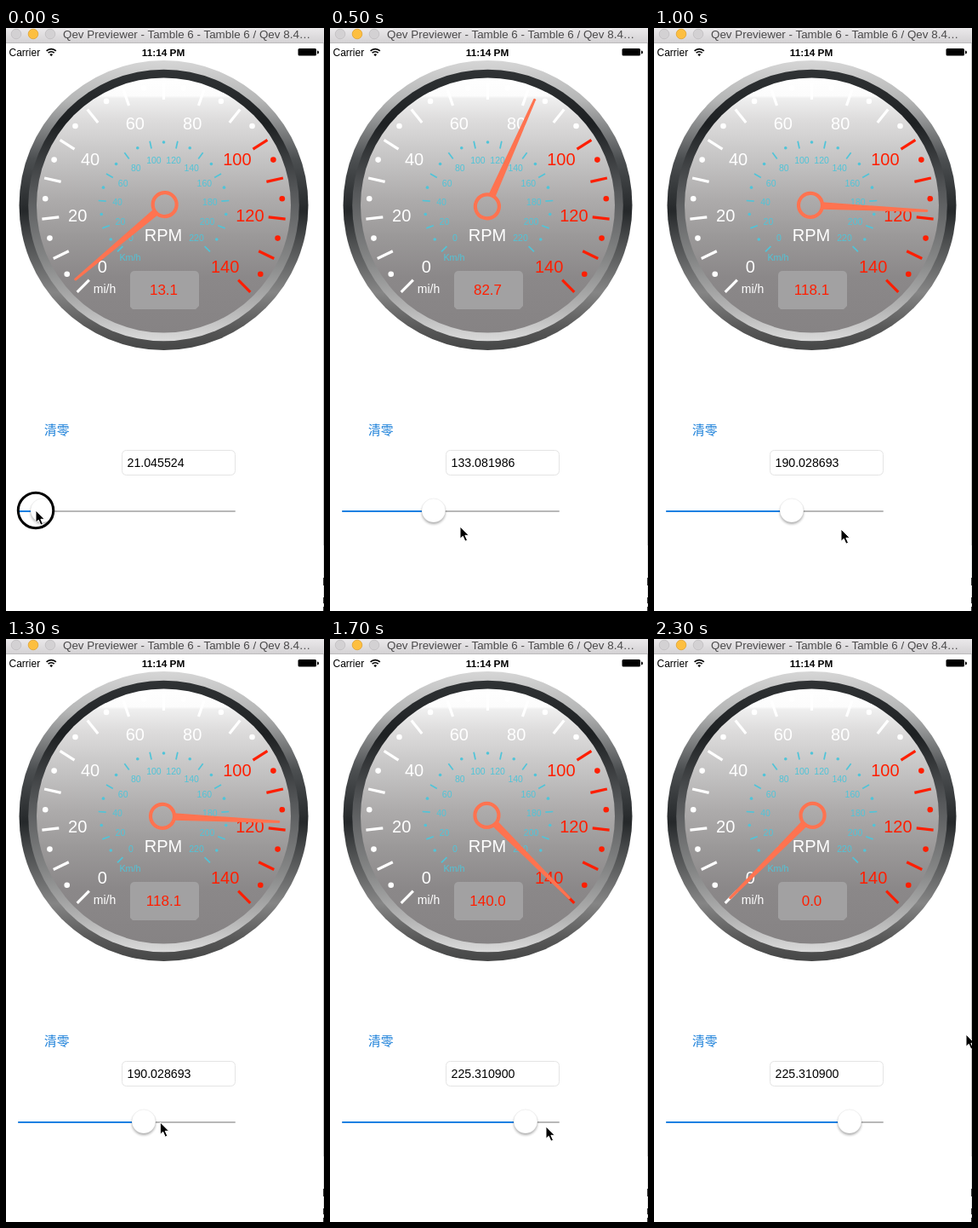
Write an HTML page that moves like this. It is 374 by 684 pixels and loops after 2400 ms.

```html
<!DOCTYPE html>
<html lang="en">
<head>
<meta charset="utf-8">
<title>Speed gauge</title>
<style>
  html, body { margin: 0; width: 100%; height: 100%; overflow: hidden; background: #fff; }
  svg { display: block; width: 374px; height: 684px; font-family: "Liberation Sans", Arial, sans-serif; }
  .mid { text-anchor: middle; }
  .cjk { font-family: "Noto Sans CJK SC", "Noto Sans CJK", sans-serif; }
</style>
</head>
<body>
<svg viewBox="0 0 374 684" xmlns="http://www.w3.org/2000/svg">
  <defs>
    <linearGradient id="bar" x2="0" y2="1">
      <stop stop-color="#ebe9eb"/><stop offset="1" stop-color="#d4d2d4"/>
    </linearGradient>
    <linearGradient id="rim" x2="0" y2="1">
      <stop stop-color="#d6d6d6"/><stop offset=".14" stop-color="#b4b5b5"/>
      <stop offset=".34" stop-color="#4c4f51"/><stop offset=".52" stop-color="#25282a"/>
      <stop offset=".63" stop-color="#4e5051"/><stop offset=".8" stop-color="#858585"/>
      <stop offset=".93" stop-color="#565656"/><stop offset="1" stop-color="#454646"/>
    </linearGradient>
    <linearGradient id="bevel" x2="0" y2="1">
      <stop stop-color="#303335"/><stop offset=".2" stop-color="#1d2022"/>
      <stop offset=".45" stop-color="#56585a"/><stop offset=".7" stop-color="#858686"/>
      <stop offset=".88" stop-color="#b4b4b4"/><stop offset="1" stop-color="#dadada"/>
    </linearGradient>
    <linearGradient id="face" x2="0" y2="1">
      <stop stop-color="#fff"/><stop offset=".07" stop-color="#fcfcfc"/>
      <stop offset=".08" stop-color="#efefef"/><stop offset=".16" stop-color="#dedddd"/>
      <stop offset=".31" stop-color="#c6c5c5"/><stop offset=".48" stop-color="#adabab"/>
      <stop offset=".62" stop-color="#9b9999"/><stop offset=".78" stop-color="#8b8889"/>
      <stop offset="1" stop-color="#868384"/>
    </linearGradient>
    <filter id="soft" x="-50%" y="-50%" width="200%" height="200%">
      <feGaussianBlur stdDeviation="1.7"/>
    </filter>
  </defs>

  <rect width="374" height="684" fill="#fff"/>
  <rect width="374" height="17" fill="url(#bar)"/>
  <path d="M0 17.5H374" stroke="#bdbbbd"/>
  <g stroke-width=".8">
    <circle cx="12" cy="7" r="5.8" fill="#d3d1d3" stroke="#c0bec0"/>
    <circle cx="32" cy="7" r="5.8" fill="#fdbf40" stroke="#dfa232"/>
    <circle cx="52" cy="7" r="5.8" fill="#d3d1d3" stroke="#c0bec0"/>
  </g>
  <text x="67" y="12" font-size="13.4" fill="#4a494a">Qev Previewer - Tamble 6 - Tamble 6 / Qev 8.4…</text>

  <text x="3.5" y="33" font-size="12">Carrier</text>
  <g fill="none" stroke="#000" stroke-width="1.7">
    <path d="M47.6 26.9a8 8 0 0 1 11.2 0M49.7 29.2a5 5 0 0 1 7 0"/>
    <path d="M53.2 33.2l-1.9-2.1a2.8 2.8 0 0 1 3.8 0z" fill="#000" stroke="none"/>
  </g>
  <text class="mid" x="185" y="32.5" font-size="11.8" font-weight="bold">11:14 PM</text>
  <rect x="343.5" y="24" width="21.5" height="8.5" rx="1.5"/>
  <path d="M366 26.5a2 2 0 0 1 0 4z"/>
  <path d="M373.5 18V607" stroke="#c4c4c4"/>
  <path d="M373.5 607V684" stroke="#e2e2e2"/>
  <path d="M373.5 645v9M373.5 668v7M373.5 679v5" stroke="#333"/>

  <circle cx="185.5" cy="208" r="170" fill="url(#rim)"/>
  <circle cx="185.5" cy="208" r="159.3" fill="url(#bevel)"/>
  <circle cx="185.5" cy="208" r="149.5" fill="url(#face)"/>
  <g id="dial"></g>
  <path d="M151 285H222a5 5 0 0 1 5 5V326l-4 4H149l-3-3V290a5 5 0 0 1 5-5z" fill="#a2a1a2"/>
  <text id="speed" class="mid" x="185.5" y="312.7" font-size="17" fill="#ff1e00"></text>
  <g id="needle" fill="#ff7350">
    <path d="M12 -4.2L136 -1.5Q138 0 136 1.5L12 4.2z"/>
    <circle cx="-1.5" r="14" fill="none" stroke="#ff7350" stroke-width="4.2"/>
  </g>

  <text class="cjk" x="45" y="476.5" font-size="14.8" fill="#1a7fd9">清零</text>
  <rect x="136.5" y="495.5" width="133" height="29" rx="5" fill="#fff" stroke="#e4e4e4"/>
  <text id="field" x="142.5" y="515" font-size="14.2"></text>

  <rect x="14" y="566" width="256" height="2" rx="1" fill="#b8b8b8"/>
  <rect id="fill" x="14" y="566" width="0" height="2" rx="1" fill="#1a80e2"/>
  <g id="thumb">
    <circle cy="2.2" r="13.8" fill="#000" opacity=".32" filter="url(#soft)"/>
    <circle r="14" fill="#fff" stroke="#000" stroke-opacity=".1" stroke-width=".6"/>
  </g>
  <g id="cursor">
    <circle id="press" r="20.7" fill="none" stroke="#000" stroke-width="3"/>
    <path d="M0 0V14.2L3.3 11.3L5.9 17.2L8.5 16L5.9 10.3H10.3z" stroke="#fff" stroke-width="1"/>
  </g>
</svg>
<script>
const $ = id => document.getElementById(id);
const LOOP = 2400, STEP = 100;
const MILES = 0.62137, MAX_KM = 225.3109, MAX_MI = 140;
const LAG = 80, RESET = 1900, RETURN = 200;
const CX = 185.5, CY = 208;
const WHITE = '#fff', RED = '#ff1e00', CYAN = '#50c4d8';

const dial = $('dial');
function add(tag, attrs, text = '') {
  const el = document.createElementNS('http://www.w3.org/2000/svg', tag);
  for (const k in attrs) el.setAttribute(k, attrs[k]);
  el.textContent = text;
  dial.append(el);
}
const angle = (v, max) => 135 + v / max * 270;
function polar(deg, r) {
  const a = deg * Math.PI / 180;
  return [CX + r * Math.cos(a), CY + r * Math.sin(a)];
}
function label(text, [x, y], size, color) {
  add('text', { x, y: y + size * 0.36, 'font-size': size, fill: color, class: 'mid' }, text);
}

// A tick every two units and a dot between them; labels on even tens.
function scale({ max, unit, tickR, dotR, labelR, width, dotSize, size, color }) {
  for (let v = 0; v <= max; v += unit) {
    const a = angle(v, max), c = color(v);
    if (v % (2 * unit)) {
      const [cx, cy] = polar(a, dotR);
      add('circle', { cx, cy, r: dotSize, fill: c });
    } else {
      const [inner, outer] = tickR.map(r => polar(a, r));
      add('path', { d: `M${inner}L${outer}`, stroke: c, 'stroke-width': width });
    }
    if (v % 20 === 0) label(v, polar(a, labelR), size, c);
  }
}
scale({ max: MAX_MI, unit: 5, tickR: [124, 144], dotR: 139.5, labelR: 102,
  width: 3.2, dotSize: 3.3, size: 20, color: v => v < 100 ? WHITE : RED });
scale({ max: 220, unit: 10, tickR: [68, 77], dotR: 74, labelR: 54.5,
  width: 1.7, dotSize: 1.8, size: 10.5, color: () => CYAN });
label('RPM', [185, 243], 20, WHITE);
label('mi/h', [116, 306], 14, WHITE);
label('Km/h', [146, 269], 10.8, CYAN);

// time, slider km
const drag = [
  [-100, 0], [0, 21.045524], [300, 82.325137], [421, 133.081986],
  [700, 133.081986], [900, 190.028693], [1500, 190.028693], [1700, 286.5]
];
// time, cursor x, cursor y
const path = [
  [0, 35, 566], [300, 86, 569], [500, 153, 585], [700, 124, 567], [900, 162, 570],
  [1000, 220, 588], [1500, 174, 563], [1700, 254, 572], [1900, 66, 474], [2300, 367, 464]
];
const presses = [[0, 500], [700, 1000], [1600, 1700], [1900, 2000]];

const linear = p => p;
const easeOut = p => 1 - (1 - p) ** 2;

function sample(keys, t, ease) {
  const i = keys.findIndex(k => k[0] > t);
  if (i < 0) return keys[keys.length - 1].slice(1);
  const a = keys[i - 1], b = keys[i];
  const p = ease((t - a[0]) / (b[0] - a[0]));
  return a.map((n, j) => n + (b[j] - n) * p).slice(1);
}
const slider = t => sample(drag, t, linear)[0];
const clampKm = km => Math.min(km, MAX_KM);

// The needle trails the slider, then swings back after the reset.
function needleAt(t) {
  const back = Math.max(0, 1 - Math.max(0, t - RESET) / RETURN);
  return clampKm(slider(t - LAG)) * MILES * back;
}

function draw(time) {
  const t = Math.floor(time % LOOP / STEP) * STEP;
  const [x, y] = sample(path, t, easeOut);
  const km = clampKm(slider(t));
  const thumbX = 28 + slider(t) * 0.705;
  const down = presses.some(([a, b]) => t >= a && t < b);
  $('field').textContent = km.toFixed(6);
  $('speed').textContent = (t > RESET ? 0 : km * MILES).toFixed(1);
  $('needle').setAttribute('transform', `translate(${CX} ${CY}) rotate(${angle(needleAt(t), MAX_MI)})`);
  $('thumb').setAttribute('transform', `translate(${thumbX} 566)`);
  $('fill').setAttribute('width', thumbX - 14);
  $('cursor').setAttribute('transform', `translate(${x} ${y})`);
  $('press').setAttribute('visibility', down ? 'visible' : 'hidden');
}

const start = performance.now();
function loop() {
  draw(performance.now() - start);
  requestAnimationFrame(loop);
}
loop();
</script>
</body>
</html>
```
